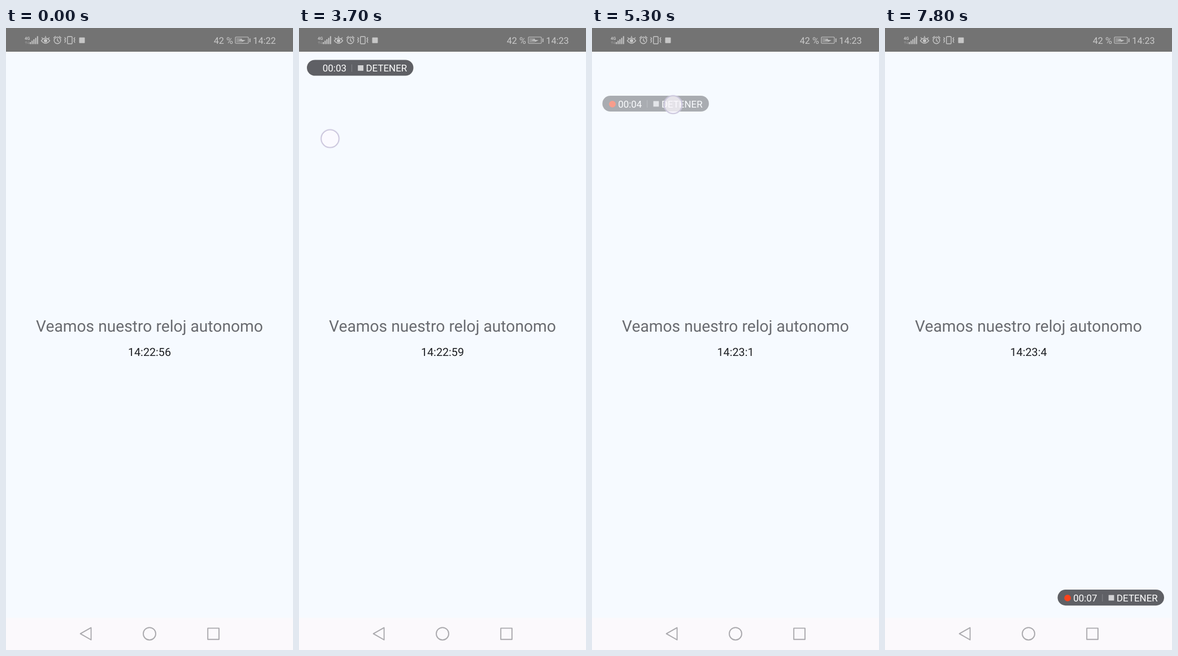
An HTML page that plays this animation: 508x1102 px, repeating every 8 s.

```html
<!DOCTYPE html>
<html lang="es">
<head>
<meta charset="utf-8">
<title>Reloj autonomo</title>
<style>
  html, body { margin: 0; width: 100%; height: 100%; overflow: hidden; background: #f6faff; }
  svg { display: block; width: 508px; height: 1102px; font-family: Roboto, sans-serif; text-rendering: geometricPrecision; }
  .line { fill: none; stroke: #c6c6c6; stroke-width: 1.4; stroke-linecap: round; stroke-linejoin: round; }
  .thin { stroke-width: 1.1; }
  .bars { stroke-width: 2; stroke-linecap: butt; }
  .solid { fill: #c6c6c6; }
  .status { font-size: 16.2px; fill: #c9c9c9; }
  .nav { fill: none; stroke: #aaa9ad; stroke-width: 1.9; stroke-linejoin: round; }
  .label { font-size: 16.93px; fill: #fff; }
</style>
</head>
<body>
<svg viewBox="0 0 508 1102">
  <rect width="508" height="1102" fill="#f6faff"/>
  <rect y="1045" width="508" height="57" fill="#fbf9fc"/>
  <rect width="508" height="42" fill="#737373"/>

  <!-- status bar -->
  <text x="33" y="21" font-size="7.5" font-weight="700" class="solid">4G</text>
  <path id="arrows" class="line thin" d="M35.5 28V24M34 25.5l1.5-1.5l1.5 1.5M39.5 24v4M38 26.5l1.5 1.5l1.5-1.5"/>
  <path class="line bars" d="M43 28.5v-3.5M46.2 28.5v-6M49.4 28.5v-8.5M52.6 28.5v-11M55.8 28.5V14.5"/>
  <path class="line" d="M62.5 22.5Q70 13.5 77.5 22.5Q70 31.5 62.5 22.5ZM63.5 17.2l1.6 1.6M70 14.8v2M76.5 17.2l-1.6 1.6"/>
  <circle class="solid" cx="70" cy="22.5" r="3"/>
  <circle class="line" cx="91" cy="22" r="5.8"/>
  <path class="line" d="M91 18.8v3.5l2.3 1.5M84.5 17.5l3-2.7M97.5 17.5l-3-2.7"/>
  <rect class="line" x="108.7" y="15.2" width="8.4" height="12.8" rx="1.2"/>
  <path class="line" d="M104 17l1.5 1.8l-1.5 2.2l1.5 2.2l-1.5 2.4M121.8 17l-1.5 1.8l1.5 2.2l-1.5 2.2l1.5 2.4"/>
  <rect class="solid" x="129.5" y="16.8" width="10" height="10" rx="1"/>
  <text class="status" x="367.7" y="27.6">42 %</text>
  <rect class="line thin" x="406" y="16" width="23" height="11.3" rx="1.2"/>
  <rect x="407.8" y="17.8" width="9.5" height="7.7" fill="#929292"/>
  <path class="solid" d="M411 22l6.5-2.8v1.8l6.5.8l-6.5 3v-2z"/>
  <rect class="solid" x="431" y="18.5" width="1.6" height="6.5"/>
  <text id="minute" class="status" x="437.3" y="27.6"></text>

  <!-- page -->
  <text x="254" y="538" text-anchor="middle" font-size="28.22" fill="#696b70">Veamos nuestro reloj autonomo</text>
  <text id="clock" x="254" y="581.2" text-anchor="middle" font-size="19.76" fill="#1d1f23"></text>

  <!-- navigation -->
  <path class="nav" d="M131.6 1073.2L150.6 1062.4V1084Z"/>
  <circle class="nav" cx="254" cy="1073.2" r="11"/>
  <rect class="nav" x="357.2" y="1063.4" width="19.8" height="19.8"/>

  <!-- recorder -->
  <g id="pill">
    <rect y=".4" width="188.5" height="28.2" rx="14.1" fill="#5f6065"/>
    <circle id="dot" cx="17.7" cy="15.3" r="5.9" fill="#fb431b"/>
    <text id="timer" class="label" x="27.8" y="21.4"></text>
    <path d="M79.4 8.5v13" stroke="#85868a"/>
    <rect x="90.2" y="10" width="9.8" height="9.8" fill="#d2d2d4"/>
    <text class="label" x="104.5" y="21.4">DETENER</text>
  </g>
  <g id="touch">
    <circle r="17" fill="none" stroke="#dcd8e8" stroke-opacity=".5"/>
    <circle r="15.7" fill="#fcf9ff" fill-opacity=".72" stroke="#cac5dc" stroke-width="1.8"/>
  </g>
</svg>
<script>
  const LOOP = 8000, STEP = 100;
  const TOUCH = 3300, DRAG = 3800, RELEASE = 7200;
  const $ = id => document.getElementById(id);

  // Finger strokes: start, duration, dx, dy; overlapping strokes add up
  const STROKES = [
    [3300, 400, 0, 116],
    [3800, 300, -5, -96],
    [4100, 300, 0, 50],
    [4700, 450, 0, -16],
    [5140, 500, 387, 0],
    [5280, 400, 0, 250],
    [5300, 1400, 0, 676]
  ];

  const clamp = (v, min, max) => Math.min(max, Math.max(min, v));
  const ease = u => { u = clamp(u, 0, 1); return u * u * (3 - 2 * u); };

  function finger(t) {
    return STROKES.reduce(([x, y], [start, time, dx, dy]) => {
      const k = ease((t - start) / time);
      return [x + dx * k, y + dy * k];
    }, [55, 80]);
  }

  // The recorder trails the finger and stays inside the page
  function pillAt(t) {
    const [x, y] = t < DRAG ? [0, 0] : finger(t - 100);
    return [clamp(x - 47, 14, 305.5), clamp(y - 14.5, 56, 994.6)];
  }

  const place = (id, pos) => $(id).setAttribute("transform", `translate(${pos})`);

  function draw(t) {
    // One beat drives both counters; it speeds up late, and the counters lag once touched
    const beat = Math.max((t + 100) / 1000, (t - 270) / 930);
    const lag = t < 3400 ? 0 : 0.5;
    const sec = 56 + Math.floor(beat + 0.5 - lag);

    $("clock").textContent = sec < 60 ? `14:22:${sec}` : `14:23:${sec - 60}`;
    $("timer").textContent = `00:0${Math.floor(beat - lag)}`;
    $("minute").textContent = t < 3600 ? "14:22" : "14:23";
    $("dot").style.opacity = beat % 1 < 0.5 ? 1 : 0;
    $("arrows").style.opacity = t >= 1000 && t < 2000 ? 1 : 0.3;

    place("pill", pillAt(t));
    $("pill").style.opacity = t < 100 ? 0 : t >= DRAG && t < RELEASE ? 0.5 : 1;
    place("touch", finger(t));
    $("touch").style.opacity = t >= TOUCH && t < RELEASE ? 1 : 0;
  }

  const start = performance.now();
  function tick() {
    const t = (performance.now() - start) % LOOP;
    draw(Math.floor(t / STEP) * STEP);
    requestAnimationFrame(tick);
  }
  tick();
</script>
</body>
</html>
```
